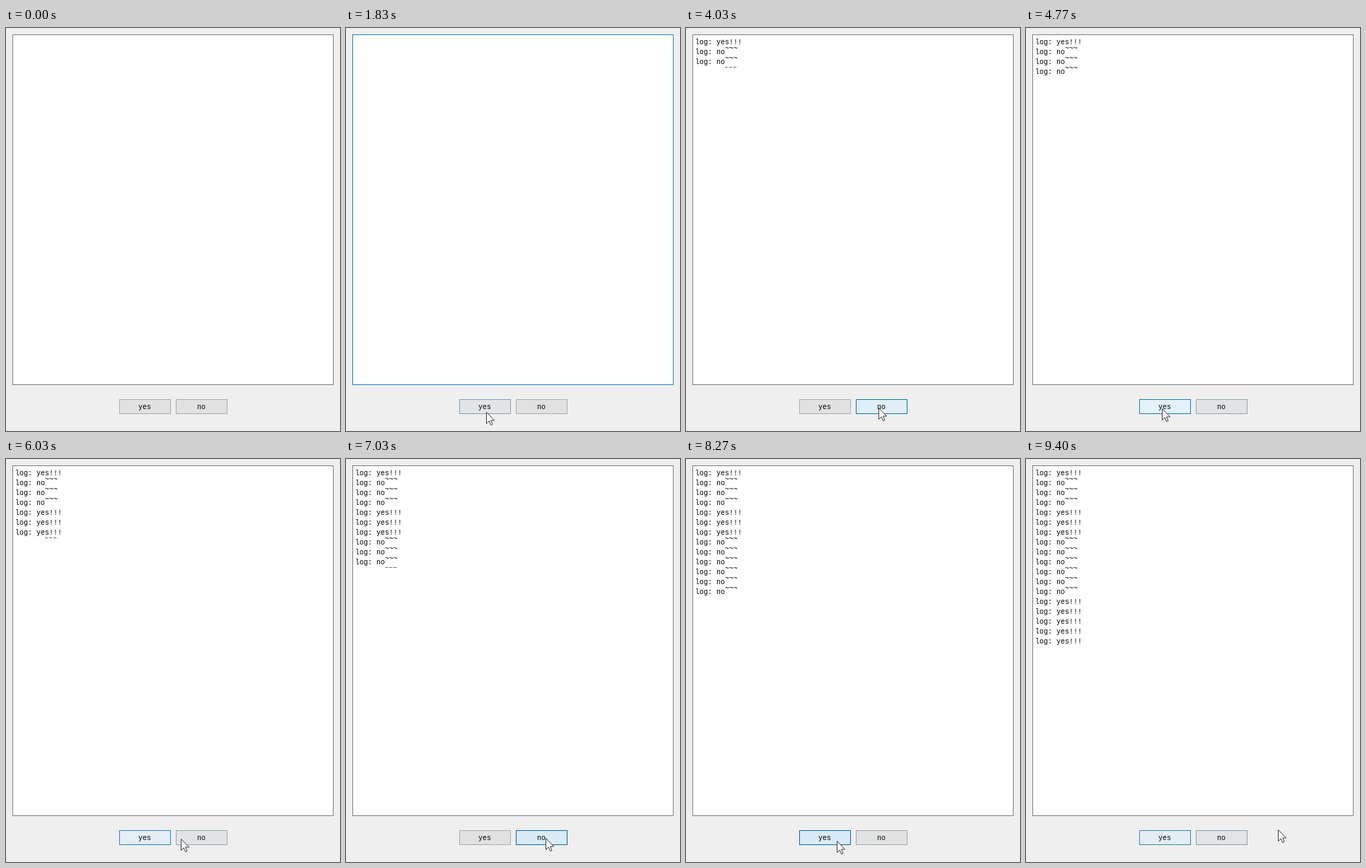
Recreate the animation shown at these times as an HTML page. Size 472x570 px, loop 9430 ms.

```html
<!DOCTYPE html>
<html lang="en">
<head>
<meta charset="utf-8">
<title>Button log</title>
<style>
  html, body { margin: 0; width: 100%; height: 100%; overflow: hidden; background: #efefef; }
  body { position: relative; font: 10px/14px "Liberation Mono", monospace; color: #000; }
  body > * { position: absolute; box-sizing: border-box; animation: 9430ms linear infinite; }
  #box { left: 9px; top: 9px; width: 454px; height: 496px; background: #fff; border: 1px solid #7e7e7e; }
  #log { left: 13px; top: 14px; margin: 0; font: inherit; overflow: hidden; height: 0; }
  #log i { position: relative; top: -5px; font-style: normal; }
  .button { top: 525px; width: 73px; height: 21px; border: 1px solid #adadad; background: #e1e1e1; white-space: pre; padding-top: 4px; }
  #yes { left: 160px; padding-left: 26px; }
  #no { left: 240px; padding-left: 29px; }
  #pointer { left: 0; top: 0; width: 13px; height: 20px; overflow: visible; }
  #box, #log, #pointer { animation-timing-function: step-end; }
  #box { animation-name: box; }
  #log { animation-name: log; }
  #yes { animation-name: yes; }
  #no { animation-name: no; }
  #pointer { animation-name: pointer; }
</style>
</head>
<body>
<div id="box"></div>
<pre id="log"></pre>
<div id="yes" class="button">yes</div>
<div id="no" class="button">no</div>
<svg id="pointer" viewBox="0 0 13 20">
  <path d="M.5 .5V16.5L4.2 13L6.7 18.6L9 17.6L6.6 12H11.6Z" fill="#fff" stroke="#3c3c3c"/>
</svg>
<script>
const LOOP = 9430, TICK = 100 / 3, ROW = 14;

// Press times; the log line is written on release.
const CLICKS = [
  ['yes', [2330]],
  ['no', [3300, 3870, 4100]],
  ['yes', [4870, 5130, 5430]],
  ['no', [6370, 6580, 6790, 6990, 7370, 7580]],
  ['yes', [8230, 8440, 8650, 8860, 9070]],
].flatMap(([name, times]) => times.map(time => ({ name, time })));
const RELEASE = 70;

// Pointer moves: start, end, target x, target y.
const START = [186, 575];
const MOVES = [
  [1370, 1833, 198, 543],
  [1833, 2030, 202, 538],
  [2660, 3230, 272, 537],
  [4300, 4730, 192, 538],
  [5770, 6230, 282, 536],
  [7800, 8170, 213, 540],
  [9267, 9400, 356, 524],
];

// Hover spans: enter, leave.
const HOVERS = {
  yes: [[1770, 2920], [4500, 5970], [7980, 9315]],
  no: [[2980, 4470], [6000, 7950]],
};

// Fill and border for the normal, hovered and pressed levels.
const LEVELS = [
  [[225, 225, 225], [173, 173, 173]],
  [[229, 241, 251], [18, 130, 180]],
  [[204, 228, 247], [4, 84, 140]],
];

const keyframes = (name, frames) => `@keyframes ${name} {` + frames
  .map(([ms, css]) => `${(ms / LOOP * 100).toFixed(3)}% {${css}}`).join('') + '}';

function paint(level) {
  const low = Math.min(Math.floor(level), 1);
  const mix = part => LEVELS[low][part].map((c, i) =>
    Math.round(c + (LEVELS[low + 1][part][i] - c) * (level - low)));
  return `background-color: rgb(${mix(0)}); border-color: rgb(${mix(1)})`;
}

function buttonFrames(name) {
  const points = [[0, 0]];
  for (const [enter, leave] of HOVERS[name])
    points.push([enter, 0], [enter + 230, 1], [leave, 1], [leave + 350, 0]);
  for (const click of CLICKS.filter(c => c.name === name))
    points.push([click.time, 1], [click.time + RELEASE, 1.85], [click.time + 190, 1]);
  if (name === 'no') points.push([9290, 0], [9350, .27], [9400, .24]);
  return points.sort((a, b) => a[0] - b[0])
    .filter(([ms]) => ms <= LOOP)
    .concat(name === 'yes' ? [[LOOP, .67]] : [[LOOP, .2]])
    .map(([ms, level]) => [ms, paint(level)]);
}

function pointerFrames() {
  const place = (x, y) => `transform: translate(${Math.round(x)}px, ${Math.round(y)}px)`;
  const frames = [[0, place(...START)]];
  let [x, y] = START;
  for (const [from, to, toX, toY] of MOVES) {
    const quick = to - from < 150;
    for (let k = Math.ceil(from / TICK); k <= Math.ceil(to / TICK); k++) {
      const p = Math.min(1, Math.max(0, (k * TICK - from) / (to - from)));
      const e = quick ? p : p * p * (3 - 2 * p);
      frames.push([k * TICK - 4, place(x + (toX - x) * e, y + (toY - y) * e)]);
    }
    [x, y] = [toX, toY];
  }
  return frames.concat([[LOOP, place(x, y)]]);
}

const logFrames = [[0, 'height: 0'],
  ...CLICKS.map((c, i) => [c.time + RELEASE - 2, `height: ${(i + 1) * ROW}px`]),
  [LOOP, `height: ${CLICKS.length * ROW}px`]];

const boxFrames = [[0, 'border-color: #7e7e7e'], [968, 'border-color: #1a84bc'],
  [2328, 'border-color: #7e7e7e'], [LOOP, 'border-color: #7e7e7e']];

document.getElementById('log').innerHTML = CLICKS
  .map(c => c.name === 'yes' ? 'log: yes!!!' : 'log: no<i>~~~</i>').join('\n');

const sheet = document.createElement('style');
sheet.textContent = [
  keyframes('box', boxFrames),
  keyframes('log', logFrames),
  keyframes('yes', buttonFrames('yes')),
  keyframes('no', buttonFrames('no')),
  keyframes('pointer', pointerFrames()),
].join('\n');
document.head.append(sheet);
</script>
</body>
</html>
```
